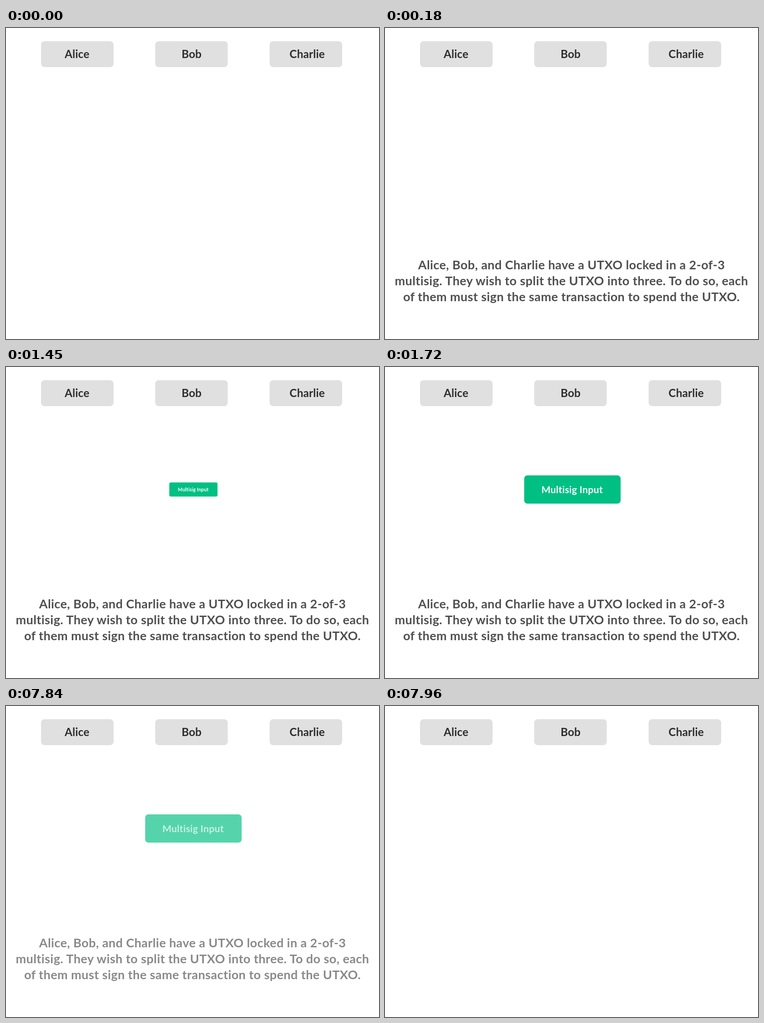
An HTML page for the animation above (7990 ms loop, 820x683 px).

```html
<!DOCTYPE html>
<html lang="en">
<head>
<meta charset="utf-8">
<title>Multisig input</title>
<style>
  html, body { margin: 0; width: 100%; height: 100%; overflow: hidden; background: #fff; }
  svg { display: block; width: 100%; height: 100%; }
  text { font-family: Lato, "Open Sans", sans-serif; font-weight: 700; text-anchor: middle; }
  .person rect { fill: #e0e0e0; }
  .person text { fill: #2d2d2d; font-size: 24.4px; letter-spacing: .15px; }
  #caption { fill: #4f4f4f; font-size: 27px; letter-spacing: .42px; }
  #input rect { fill: #00bf83; }
  #input text { fill: #fff; font-size: 21.2px; letter-spacing: .28px; }
</style>
</head>
<body>
<svg viewBox="0 0 820 683">
  <g class="person">
    <rect x="77" y="29" width="159.5" height="57" rx="8"/>
    <rect x="328" y="29" width="159.5" height="57" rx="8"/>
    <rect x="579.5" y="29" width="159.5" height="57" rx="8"/>
    <text x="156.2" y="65.7">Alice</text>
    <text x="408" y="65.7">Bob</text>
    <text x="662.2" y="65.7">Charlie</text>
  </g>
  <g id="input">
    <rect x="-106" y="-31" width="212" height="62" rx="7"/>
    <text x="-.7" y="7.5">Multisig Input</text>
  </g>
  <g id="caption">
    <text x="410" y="530">Alice, Bob, and Charlie have a UTXO locked in a 2-of-3</text>
    <text x="410" y="565">multisig. They wish to split the UTXO into three. To do so, each</text>
    <text x="410" y="600">of them must sign the same transaction to spend the UTXO.</text>
  </g>
</svg>
<script>
const LOOP = 7990, STEP = 30;
const FADE_IN = 0, GROW = 1180, FADE_OUT = 7780;
const FADE_TIME = 180, GROW_TIME = 540;
const MIN_SCALE = .01;

const input = document.getElementById('input');
const caption = document.getElementById('caption');

// Progress from 0 to 1, advancing in whole steps
const progress = (time, start, duration) => {
  const elapsed = Math.floor((time - start) / STEP) * STEP;
  return Math.min(1, Math.max(0, elapsed / duration));
};
const easeInOut = p => (1 - Math.cos(Math.PI * p)) / 2;

function draw(time) {
  const remaining = 1 - progress(time, FADE_OUT, FADE_TIME);
  caption.setAttribute('opacity', progress(time, FADE_IN, FADE_TIME) * remaining);

  const scale = Math.max(MIN_SCALE, easeInOut(progress(time, GROW, GROW_TIME)));
  input.setAttribute('visibility', time < GROW ? 'hidden' : 'visible');
  input.setAttribute('transform', `translate(412 269) scale(${scale})`);
  // Box and label fade separately, so the label takes on the green
  for (const part of input.children) part.setAttribute('opacity', remaining);
}

const begin = performance.now();
function tick() {
  draw((performance.now() - begin) % LOOP);
  requestAnimationFrame(tick);
}
tick();
</script>
</body>
</html>
```
